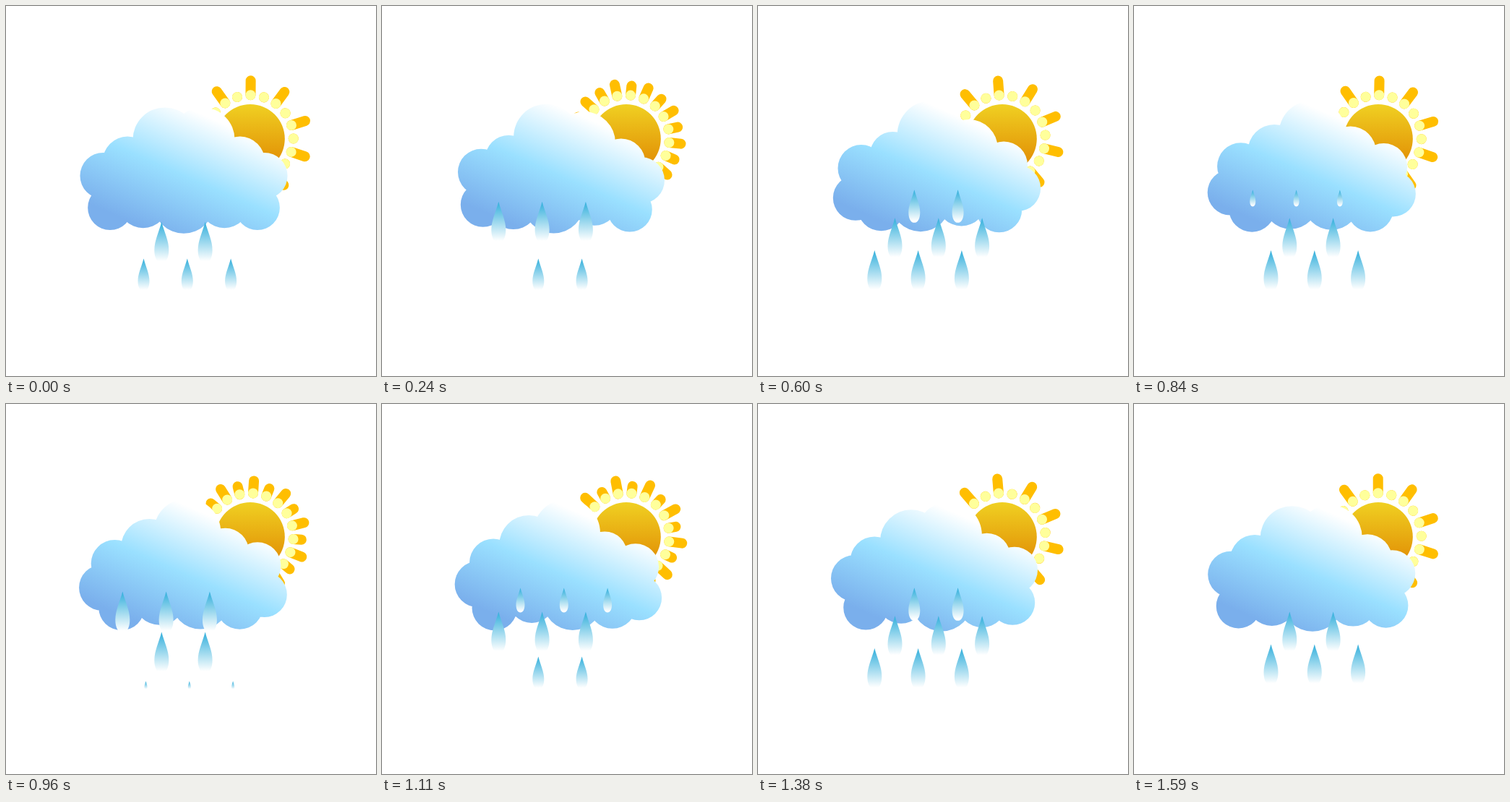
An HTML page with a canvas that plays this animation: 512x512 px, repeating every 1.62 s.

```html
<!DOCTYPE html>
<html lang="en">
<head>
<meta charset="utf-8">
<title>Sun shower</title>
<style>
html, body { margin: 0; width: 100%; height: 100%; overflow: hidden; background: #fff; }
canvas { display: block; width: 100vmin; height: 100vmin; }
</style>
</head>
<body>
<canvas id="stage" width="512" height="512"></canvas>
<script>
const ctx = document.getElementById('stage').getContext('2d');
const LOOP = 1620, STEP = 30, TAU = Math.PI * 2;
const { sin, cos, PI } = Math;

function gradient(x0, y0, x1, y1, ...stops) {
  const g = ctx.createLinearGradient(x0, y0, x1, y1);
  stops.forEach(([at, color]) => g.addColorStop(at, color));
  return g;
}

function disc(x, y, r) {
  ctx.beginPath();
  ctx.arc(x, y, r, 0, TAU);
  ctx.fill();
}

// ---- Sun ----
const SUN = { x: 338, y: 183.8, r: 47.8 };
const RAYS = { count: 20, x: 338, y: 183, ring: 59.7, reach: 20, width: 14 };
const sunFill = gradient(338, 136, 338, 232, [0, '#f0d022'], [1, '#df8400']);

// A ray shrinks during one half of the loop and springs back in the other.
function rayLength(t) {
  const p = t % LOOP, half = LOOP / 2;
  if (p < half) return (1 + cos(PI * Math.min(1, p / 600))) / 2;
  const rise = Math.min(1, Math.max(0, (p - half - 30) / 495));
  return 1 - (1 - rise) ** 3;
}

function drawSun(t) {
  ctx.fillStyle = sunFill;
  disc(SUN.x, SUN.y, SUN.r);
  ctx.strokeStyle = '#ffbe00';
  ctx.lineWidth = RAYS.width;
  ctx.lineCap = 'round';
  const spacing = TAU / RAYS.count;
  for (let i = 0; i < RAYS.count; i++) {
    const a = spacing * (i + 2 * t / LOOP) - PI / 2 + 0.008;
    const at = r => [RAYS.x + r * cos(a), RAYS.y + r * sin(a)];
    const length = rayLength(t + (i % 2) * LOOP / 2);
    ctx.beginPath();
    ctx.moveTo(...at(RAYS.ring));
    ctx.lineTo(...at(RAYS.ring + 0.01 + RAYS.reach * length));
    ctx.stroke();
    ctx.fillStyle = '#ffff9b';
    disc(...at(RAYS.ring), RAYS.width / 2);
  }
}

// ---- Cloud: equal steps along a smooth, mirror-symmetric closed path ----
const PUFF_COUNT = 11;
const cloudFill = gradient(130, 280, 200, 119,
  [0, '#7aafec'], [0.5, '#9ae0ff'], [1, '#ffffff']);

// a is 0 at the top of the cloud and PI at its bottom.
function puffAt(a) {
  const c = k => cos(k * a);
  const v = Math.acos(c(1)) * PUFF_COUNT / PI;
  const dimple = at => 6.5 * Math.exp(-(((v - at) / 0.4) ** 2));
  return {
    x: 246 + 109 * sin(a) - 2 * sin(2 * a) - 4.6 * sin(3 * a),
    y: 240.4 - 47.2 * c(1) - 12.4 * c(2) + 4.8 * c(3) - 5 * c(4) - 5.1 * c(5) + 1.7 * c(6),
    r: 36.2 + 2 * c(1) + 6.4 * c(2) + 2 * c(4) - dimple(2.35) - dimple(9.55)
  };
}

function drawCloud(t) {
  const puffs = Array.from({ length: PUFF_COUNT },
    (_, i) => puffAt(TAU * (i - 0.5 + t / LOOP) / PUFF_COUNT));
  ctx.fillStyle = cloudFill;
  ctx.beginPath();
  puffs.forEach(({ x, y }) => ctx.lineTo(x, y));
  ctx.closePath();
  for (const { x, y, r } of puffs) {
    ctx.moveTo(x + r, y);
    ctx.arc(x, y, r, 0, TAU);
  }
  ctx.fill();
}

// ---- Rain: three rows start one after another, twice per loop ----
const ROWS = [
  { x: 161.3, count: 3 },
  { x: 189.5, count: 3 },
  { x: 215.3, count: 2 }
];
const RAIN = { rowDelay: 240, period: 780, wrap: 1650, spacing: 60.3 };
const DROP = { top: 255, low: 339, height: 56, grow: 150, land: 600 };
const dropFill = gradient(0, 0, 0, 56, [0, '#35b0dc'], [0.95, '#ffffff']);
const dropShape = new Path2D('M0 -1C4 14 10 25 10 38C10 49 6 56 0 56C-6 56 -10 49 -10 38C-10 25 -4 14 0 -1Z');

function drawDrop(x, age) {
  const { top, low, height, grow, land } = DROP;
  let scale = 1, y = top;
  if (age < grow) {
    scale = age / grow;
  } else if (age <= land) {
    y += (low - top) * (age - grow) / (land - grow);
  } else {
    scale = 1 - (age - land) / grow;
    y = low + height * (1 - scale);
  }
  if (scale <= 0) return;
  ctx.save();
  ctx.translate(x + 5 * (1 - scale), y);
  ctx.scale(scale, scale);
  ctx.fillStyle = dropFill;
  ctx.fill(dropShape);
  ctx.restore();
}

function drawRain(t) {
  const { rowDelay, period, wrap, spacing } = RAIN;
  ROWS.forEach(({ x, count }, row) => {
    for (const start of [period - wrap, 0, period]) {
      const age = t - row * rowDelay - start;
      if (age <= 0) continue;
      for (let i = 0; i < count; i++) drawDrop(x + i * spacing, age);
    }
  });
}

function render(now) {
  const t = Math.floor((now % LOOP) / STEP) * STEP;
  ctx.fillStyle = '#fff';
  ctx.fillRect(0, 0, 512, 512);
  drawSun(t);
  drawCloud(t);
  drawRain(t);
}

let origin;
function tick(now) {
  origin ??= now;
  render(now - origin);
  requestAnimationFrame(tick);
}
render(0);
requestAnimationFrame(tick);
</script>
</body>
</html>
```
